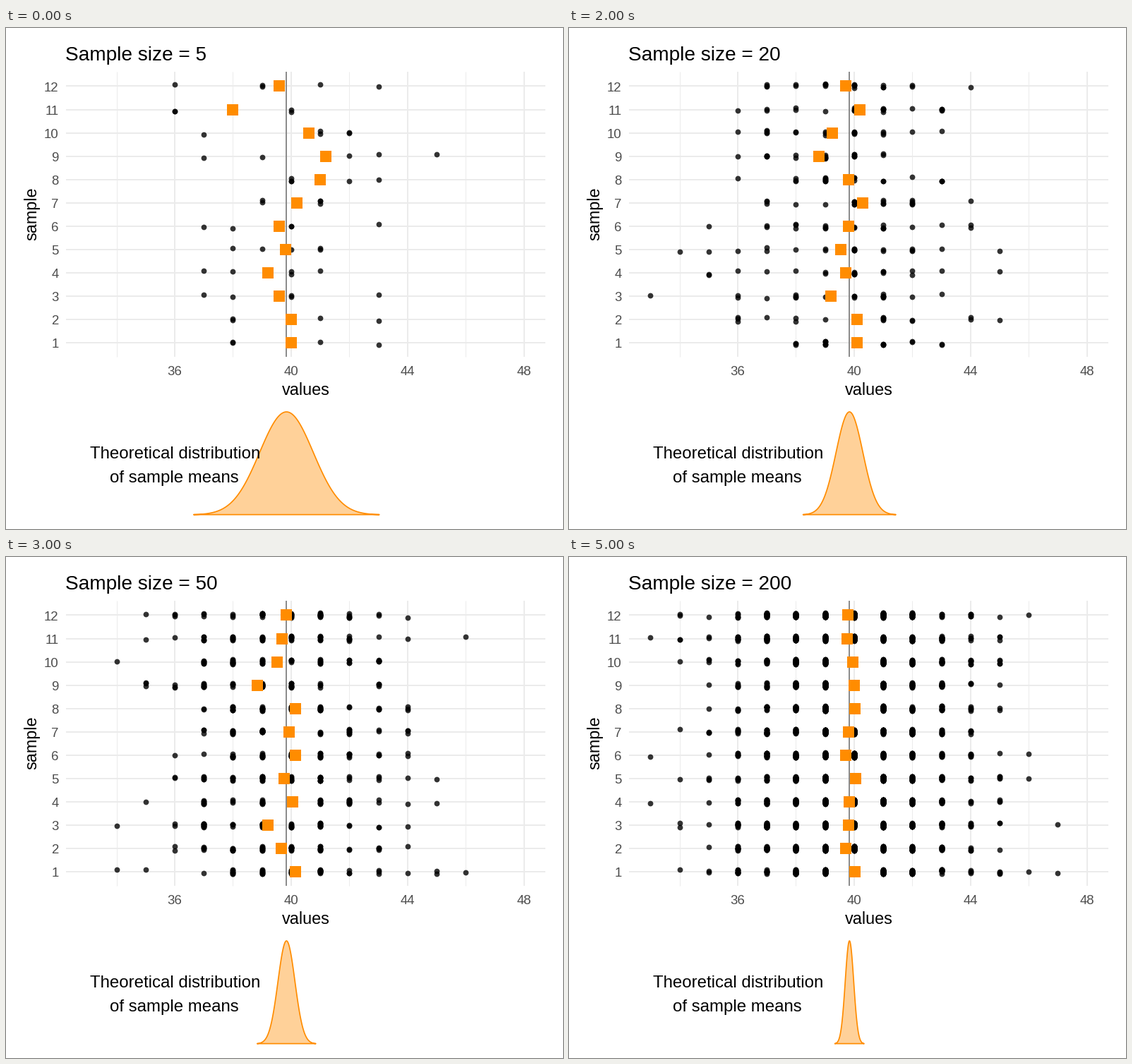
Write a matplotlib script that moves like this. It is 789 px wide and 710 px high and loops after 6 s.

```python
import numpy as np
import matplotlib.pyplot as plt
from matplotlib.animation import FuncAnimation

W, H, DPI = 789, 710, 100
PX = 72 / DPI
ORANGE, GRID, AXIS = "#FF8C00", "#EBEBEB", "#4D4D4D"
MU, SD = 39.84, 2.06
ROWS = np.arange(1, 13)

# sample size -> mean of each sample, from sample 1 up to 12
MEANS = {
    5: [40, 40, 39.6, 39.2, 39.8, 39.6, 40.2, 41, 41.2, 40.6, 38, 39.6],
    10: [41.1, 39.4, 39.9, 39.3, 40, 39.6, 39.3, 39.4, 39.3, 40.6, 40.1, 38.9],
    20: [40.1, 40.1, 39.2, 39.7, 39.55, 39.8, 40.3, 39.8, 38.8, 39.25, 40.2,
         39.7],
    50: [40.16, 39.66, 39.2, 40.06, 39.76, 40.16, 39.94, 40.16, 38.84, 39.52,
         39.68, 39.84],
    100: [39.46, 39.46, 40.06, 39.94, 39.96, 40.08, 39.94, 39.46, 39.68, 39.58,
          40.08, 39.82],
    200: [40.02, 39.7, 39.82, 39.84, 40.06, 39.72, 39.8, 40.02, 40, 39.96,
          39.76, 39.78],
}
SIZES = list(MEANS)


def x_of(v):
    return 239 + 41.22 * (v - 36)


def y_of(row):
    return 446 - 33.05 * (row - 1)


def draw_sample(rng, n, mean):
    """Whole-number normal values whose mean is exactly the given one."""
    z = rng.normal(size=n)
    v = np.round(mean + SD * (z - z.mean()))
    gap = int(round(mean * n - v.sum()))
    v[:abs(gap)] += np.sign(gap)
    return v


def make_dots(n):
    rng = np.random.default_rng(n)
    values = np.array([draw_sample(rng, n, m) for m in MEANS[n]])
    jitter = rng.uniform(-0.1, 0.1, values.shape)
    return x_of(values).ravel(), y_of(ROWS[:, None] + jitter).ravel()


def bell(n):
    t = np.linspace(-3.46, 3.46, 241)
    width = 38 * np.sqrt(5 / n)
    return np.column_stack([x_of(MU) + width * t,
                            690 - 146 * np.exp(-t ** 2 / 2)])


fig = plt.figure(figsize=(W / DPI, H / DPI), dpi=DPI, facecolor="white")
plt.rcParams["font.family"] = "Liberation Sans"
ax = fig.add_axes([0, 0, 1, 1])
ax.set_xlim(0, W)
ax.set_ylim(H, 0)
ax.axis("off")


def line(xs, ys, color, width, z=1):
    ax.plot(xs, ys, color=color, lw=width * PX, solid_capstyle="butt",
            zorder=z)


def label(x, y, s, size, color="black", ha="center", **kw):
    return ax.text(x, y, s, fontsize=size * PX, color=color, ha=ha,
                   va="baseline", zorder=6, **kw)


for v in range(34, 49, 2):
    major = v % 4 == 0
    line([x_of(v)] * 2, [62, 466], GRID, 2 if major else 1)
    if major:
        label(x_of(v), 492, str(v), 18.67, AXIS)
for r in ROWS:
    line([85, 764], [y_of(r)] * 2, GRID, 2)
    label(74.5, y_of(r) + 7.2, str(r), 18.67, AXIS, "right")
line([x_of(MU)] * 2, [62, 466], "#8C8C8C", 2, z=3)

label(424.5, 520, "values", 23.33)
label(43.5, 263, "sample", 23.33, rotation=90, rotation_mode="anchor")
label(239.3, 610, "Theoretical distribution", 24)
label(238.8, 644, "of sample means", 24)
title = label(84.5, 46, "", 28, ha="left")

dots, = ax.plot([], [], "o", ms=7.8 * PX, mew=0, color="black", alpha=0.8,
                zorder=4)
means, = ax.plot([], [], "s", ms=16 * PX, mew=0, color=ORANGE, zorder=5)
curve, = ax.fill([0, 1, 1], [0, 0, 1], fc=(1, 0.549, 0, 0.4), ec=ORANGE,
                 lw=1.7 * PX, joinstyle="round", zorder=3)


def update(i):
    n = SIZES[i]
    title.set_text(f"Sample size = {n}")
    dots.set_data(*make_dots(n))
    means.set_data(x_of(np.array(MEANS[n])), y_of(ROWS))
    curve.set_xy(bell(n))
    return title, dots, means, curve


anim = FuncAnimation(fig, update, frames=len(SIZES), interval=1000,
                     init_func=lambda: update(0), repeat=True,
                     repeat_delay=0, blit=False)
plt.show()
```
